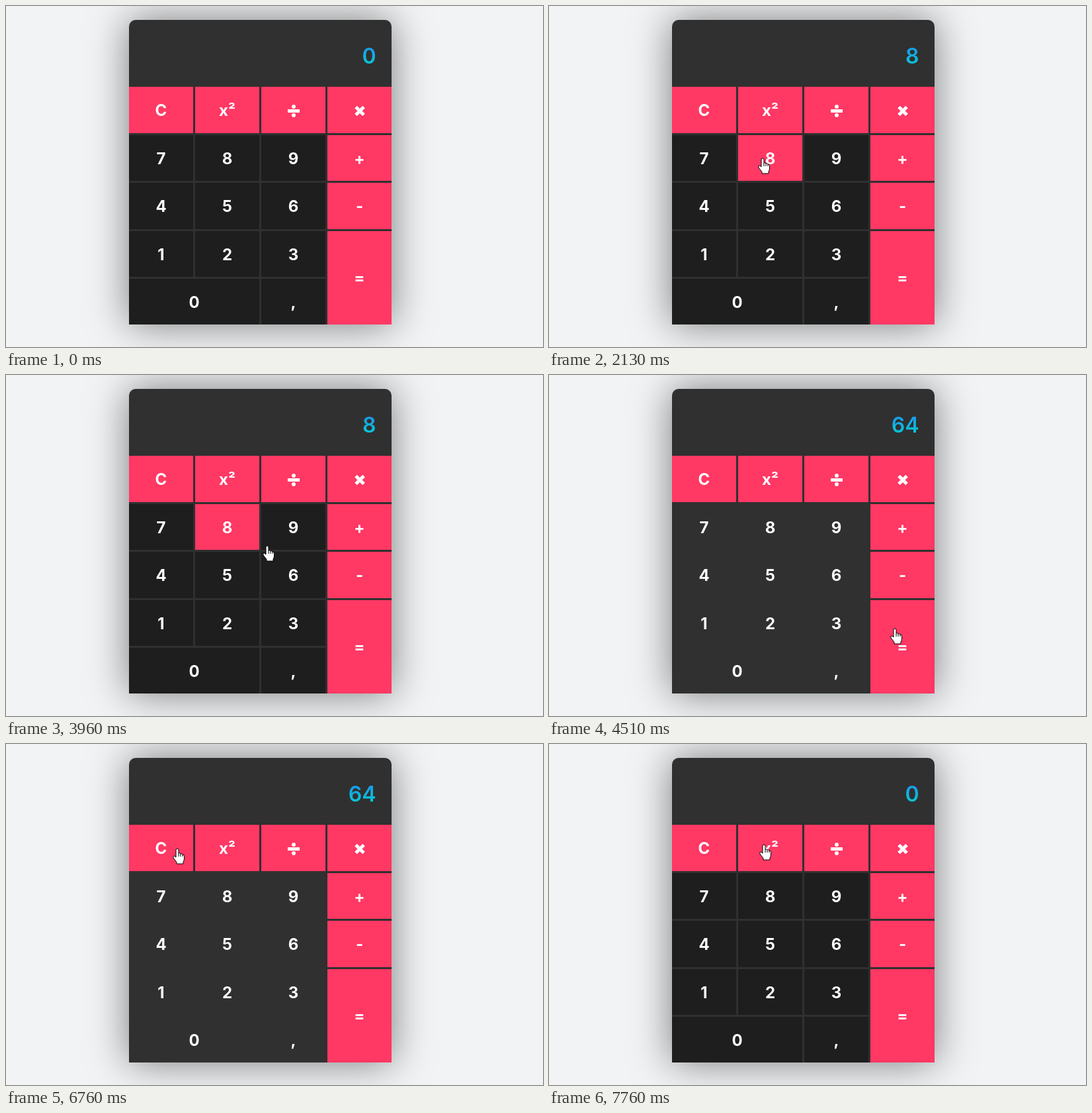
Write an HTML page that moves like this. It is 812x515 px and loops after 8000 ms.

```html
<!DOCTYPE html>
<html lang="en">
<head>
<meta charset="utf-8">
<title>Calculator</title>
<style>
  html, body { margin: 0; width: 100%; height: 100%; overflow: hidden; background: #f1f3f5; }
  #calc {
    position: absolute; left: 186px; top: 21px; width: 397px; height: 460px;
    background: #303030; border-radius: 10px 10px 0 0;
    box-shadow: 0 0 60px rgba(0, 0, 0, .5);
    font: 700 24px Inter, sans-serif; color: #fff;
  }
  #display {
    position: absolute; right: 23.5px; top: 34px;
    font-size: 32px; font-weight: 600; line-height: 42px;
    background: linear-gradient(#1a98ec 15%, #06ccd2 85%);
    -webkit-background-clip: text; background-clip: text; color: transparent;
  }
  #keys {
    position: absolute; top: 101px; display: grid; gap: 3px;
    grid-template: 70px 69px 70px 69px 69px / repeat(4, 97px);
  }
  .key {
    display: flex; align-items: center; justify-content: center;
    box-sizing: border-box; padding-top: 1px; min-height: 0; background: #ff3864;
  }
  .digit { background: #1e1e1e; }
  .digit.hover { background: #ff3864; }
  .disabled .digit { background: #303030; }
  .wide { grid-column: span 2; }
  .tall { grid-area: 4 / 4 / 6 / 5; padding: 0; }
  #overlay { position: absolute; left: 0; top: 0; pointer-events: none; }
</style>
</head>
<body>
<div id="calc">
  <div id="display">0</div>
  <div id="keys"></div>
</div>
<svg id="overlay" width="812" height="515">
  <g id="pointer">
    <circle id="ring" r="13" fill="#ff0" fill-opacity=".5"/>
    <g fill="#fff" stroke="#000" stroke-linejoin="round">
      <path id="arrow" d="M0 0V17L4 13.5 6.5 19.5 9 18.5 6.5 12.5H12Z"/>
      <g id="hand">
        <path d="M-2 2Q-2 0 0 0T2 2V7Q4 6 5 8 7 7 8 9 10.5 8.5 10.5 11.5V15Q10.5 18 9 20V23H-1V20.5L-6 14Q-7 11-4.5 11L-2 13Z"/>
        <path fill="none" d="M2 7v5M5 8v4M8 9v3"/>
      </g>
    </g>
  </g>
</svg>
<script>
const $ = id => document.getElementById(id);
const LOOP = 8000, START = 420, STEP = 77.2, PRESS = 70;

// Each move eases to (x, y), optionally bowed down or up, and may end in a click
const moves = [
  { from: 420, to: 1050, x: 190, y: 228 },
  { from: 1050, to: 1480, x: 317, y: 227, click: '8', at: 1900 },
  { from: 2060, to: 2660, x: 541, y: 158, bow: 55, click: '×', at: 2890 },
  { from: 2960, to: 3600, x: 352, y: 258, click: '8', at: 3670 },
  { from: 3800, to: 4320, x: 523, y: 383, bow: -44, click: '=', at: 4437 },
  { from: 4590, to: 4970, x: 523, y: 451 },
  { from: 5280, to: 5700, x: 231, y: 235 },
  { from: 5700, to: 5990, x: 295, y: 203, click: '8', at: 6060 },
  { from: 6080, to: 6400, x: 320, y: 377 },
  { from: 6400, to: 6750, x: 259, y: 158, click: 'C', at: 6980 },
  { from: 7040, to: 7500, x: 324, y: 205, bow: 30 },
  { from: 7500, to: 7750, x: 325, y: 152 }
];
const clicks = moves.filter(m => m.click);

const divide = '<svg width="20" height="20" fill="#fff"><path d="M1 8h18v5H1z"/><circle cx="10" cy="4" r="3"/><circle cx="10" cy="17" r="3"/></svg>';
const times = '<svg width="20" height="20" stroke="#fff" stroke-width="5"><path d="M4 4.5l12 12m0-12l-12 12"/></svg>';
for (const label of ['C', 'x²', divide, times, ...'789+456-123=0,']) {
  const key = document.createElement('div');
  key.className = 'key' + (/^[\d,]$/.test(label) ? ' digit' : '') +
    (label === '0' ? ' wide' : label === '=' ? ' tall' : '');
  key.innerHTML = label;
  $('keys').append(key);
}

function pointerAt(t) {
  let x = 785, y = 481;
  for (const m of moves) {
    if (t < m.from) break;
    const u = Math.min(1, (t - m.from) / (m.to - m.from));
    const eased = u * u * (3 - 2 * u);
    x += (m.x - x) * eased;
    y += (m.y - y) * eased + (m.bow ?? 0) * Math.sin(Math.PI * eased);
  }
  return [x, y];
}

// Replays the clicks so far; digits are locked once a result is shown
function calculate(t) {
  let shown = '0', stored = 0, solved = false;
  for (const { click, at } of clicks) {
    if (t < at + PRESS) break;
    if (click === 'C') {
      shown = '0';
      solved = false;
    } else if (solved) {
      continue;
    } else if (click === '×') {
      stored = shown;
      shown = '0';
    } else if (click === '=') {
      shown = String(stored * shown);
      solved = true;
    } else {
      shown = String(+(shown + click));
    }
  }
  return { shown, solved };
}

const keyAt = ([x, y]) => document.elementFromPoint(x, y)?.closest('.key');
const show = (id, on) => $(id).style.display = on ? '' : 'none';

function draw(now) {
  const t = START + STEP * Math.floor((now % LOOP - START) / STEP + .16);
  const eventTime = t + 25;
  const pos = pointerAt(t);
  const { shown, solved } = calculate(eventTime);

  $('display').textContent = shown;
  $('calc').classList.toggle('disabled', solved);

  // Hover follows the pointer one step late
  const hovered = solved ? null : keyAt(pointerAt(t - STEP));
  document.querySelectorAll('.digit').forEach(k => k.classList.toggle('hover', k === hovered));

  const overKey = !!keyAt(pos);
  $('pointer').setAttribute('transform', `translate(${pos.map(Math.round)})`);
  show('pointer', t >= START);
  show('hand', overKey);
  show('arrow', !overKey);
  show('ring', clicks.some(({ at }) => eventTime >= at && eventTime < at + PRESS));
}

const origin = performance.now();
function tick() {
  draw(performance.now() - origin);
  requestAnimationFrame(tick);
}
tick();
</script>
</body>
</html>
```
